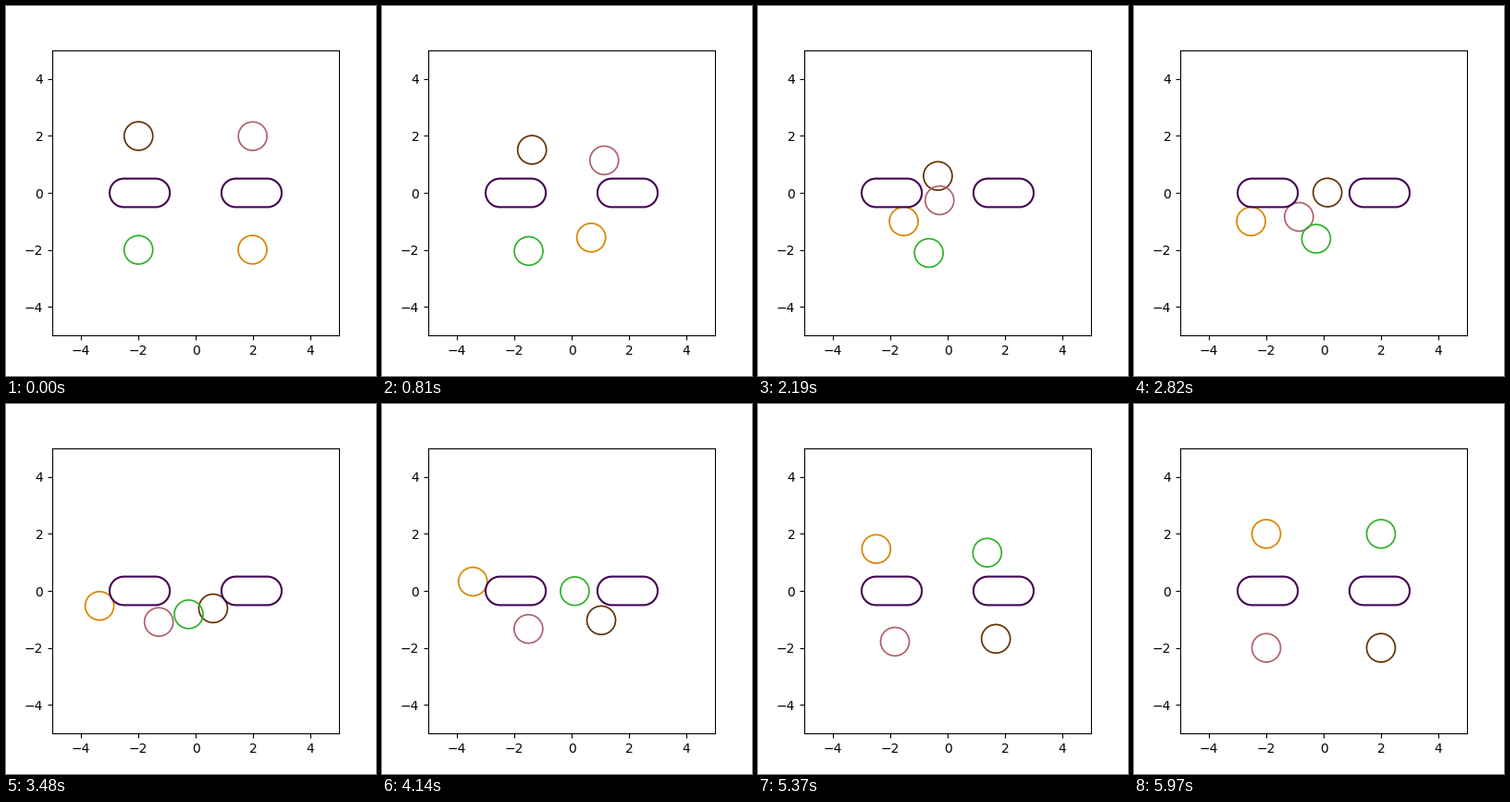
Recreate the animation shown at these times as a matplotlib script. Size 400 by 400 pixels, loop 6000 ms.

```python
import numpy as np
import matplotlib.pyplot as plt
from matplotlib.animation import FuncAnimation
from matplotlib.patches import Circle, Polygon

FRAMES, STEP = 200, 30
RADIUS = 0.5
START, END = -0.01, 5.97
WALLS = [(-2.5, -1.4), (1.4, 2.5)]  # core of each capsule, along y = 0

# Each disc swaps corners through a few turns (seconds, x, y)
DISCS = [
    ("#663300", (-2, 2), [(1.9, -0.56, 0.86), (3.7, 0.8, -0.8)]),
    ("#b0626a", (2, 2), [(1.9, -0.01, 0), (2.82, -0.87, -0.83), (3.6, -1.36, -1.14)]),
    ("#30b22a", (-2, -2), [(2.2, -0.65, -2.11), (2.82, -0.26, -1.61),
                           (3.6, -0.24, -0.68), (4.14, 0.11, -0.01)]),
    ("#d98600", (2, -2), [(1.9, -1.07, -1), (2.82, -2.53, -1),
                          (3.6, -3.42, -0.39), (4.4, -3.28, 0.61)]),
]


def slide(x, y):
    """Keep a disc from entering the capsules, so that it rolls around them."""
    for left, right in WALLS:
        dx = x - np.clip(x, left, right)
        push = max(1, 2 * RADIUS / np.hypot(dx, y))
        x, y = x + dx * (push - 1), y * push
    return x, y


def place(corner, turns, t):
    x, y = corner
    times, xs, ys = zip((START, x, y), *turns, (END, -x, -y))
    return slide(np.interp(t, times, xs), np.interp(t, times, ys))


def capsule(left, right):
    a = np.linspace(-np.pi / 2, np.pi / 2, 60)
    x = np.concatenate([right + RADIUS * np.cos(a), left - RADIUS * np.cos(a)])
    y = np.concatenate([RADIUS * np.sin(a), -RADIUS * np.sin(a)])
    return Polygon(np.column_stack([x, y]), fill=False, ec="#440154",
                   lw=1.5, joinstyle="round", zorder=2)


fig, ax = plt.subplots(figsize=(4, 4), dpi=100)
ax.set(xlim=(-5, 5), ylim=(-5, 5), xticks=range(-4, 5, 2), yticks=range(-4, 5, 2))
for wall in WALLS:
    ax.add_patch(capsule(*wall))
discs = [ax.add_patch(Circle(corner, RADIUS, fill=False, ec=color, lw=1.25))
         for color, corner, _ in DISCS]


def update(k):
    for disc, (_, corner, turns) in zip(discs, DISCS):
        disc.center = place(corner, turns, k * STEP / 1000)
    return discs


anim = FuncAnimation(fig, update, frames=FRAMES, interval=STEP, repeat=True, repeat_delay=0)
plt.show()
```
